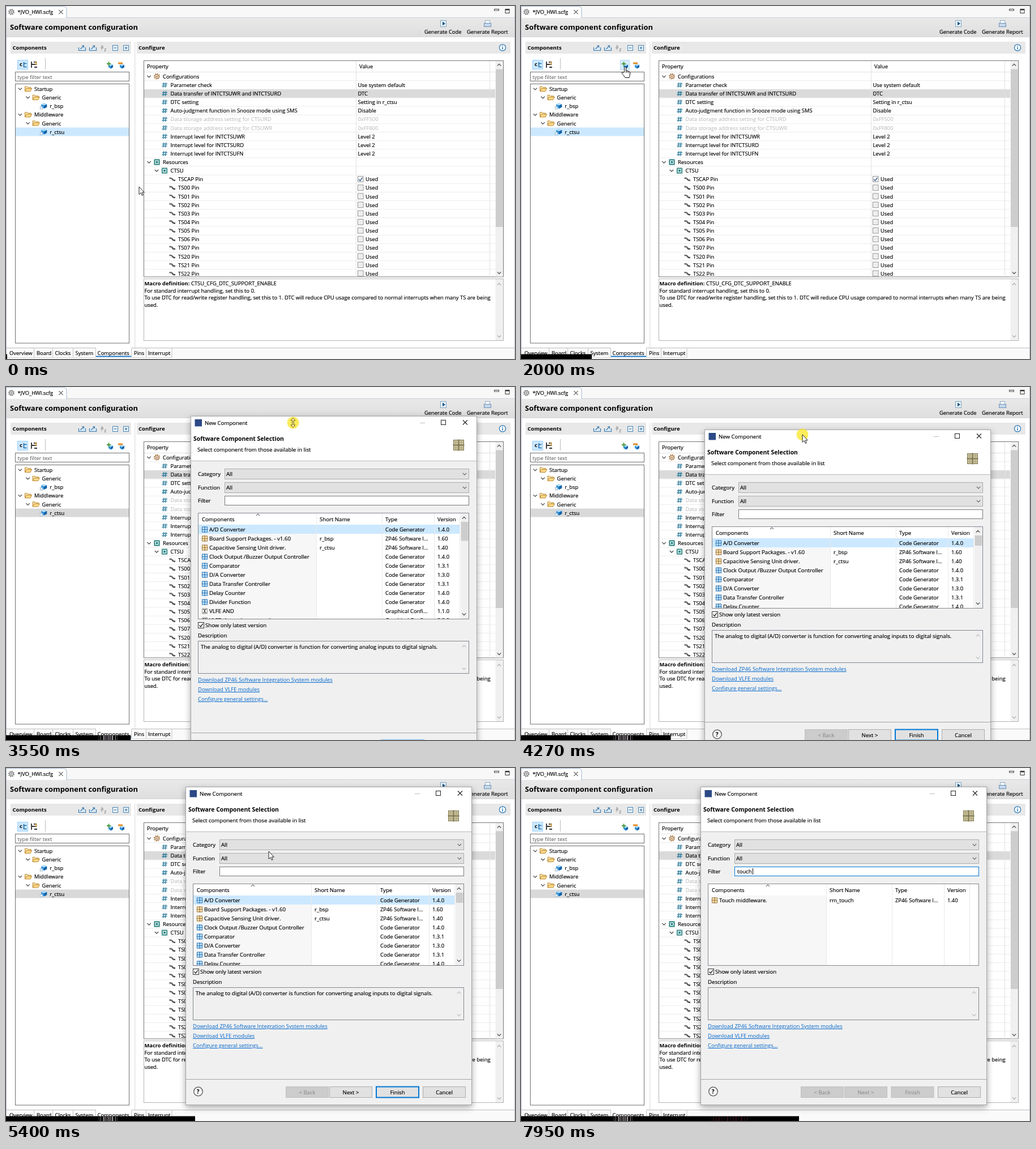
Animation, 899 px wide and 623 px high, one loop 7.99 s. Source, as an HTML page:

```html
<!DOCTYPE html>
<html lang="en">
<head>
<meta charset="utf-8">
<title>Component configuration</title>
<style>
html, body { margin: 0; width: 100%; height: 100%; overflow: hidden; background: #fff; }
svg { display: block; width: 899px; height: 623px; }
text { font: 9.4px "Open Sans", "Noto Sans", sans-serif; white-space: pre; }
text[fill="#000"] { stroke: #000; stroke-width: .18px; }
#dialog text { font-size: 9.62px; }
#dialog text.col { font-size: 9.4px; }
#dialog text.link { font-size: 9.5px; }
#dialog #about { font-size: 9.68px; }
</style>
</head>
<body>
<svg id="stage" viewBox="0 0 899 623" xmlns="http://www.w3.org/2000/svg"></svg>
<script>
const LOOP = 7990;
const stage = document.getElementById('stage');
const $ = id => document.getElementById(id);

// Drawing helpers
const esc = s => s.replace(/&/g, '&amp;').replace(/</g, '&lt;').replace(/>/g, '&gt;');
const text = (x, y, s, fill = '#000', extra = '') =>
  `<text x="${x}" y="${y}" fill="${fill}" ${extra}>${esc(s)}</text>`;
const bold = (x, y, s, size) => text(x, y, s, '#000', `style="font-weight:700;font-size:${size}px;stroke:none"`);
const rect = (x, y, w, h, fill, stroke = 'none', extra = '') =>
  `<rect x="${x}" y="${y}" width="${w}" height="${h}" fill="${fill}" stroke="${stroke}" ${extra}/>`;
const path = (d, stroke, width = 1, fill = 'none', extra = '') =>
  `<path d="${d}" fill="${fill}" stroke="${stroke}" stroke-width="${width}" ${extra}/>`;
const chevron = (x, y, dir = 1, color = '#444', r = 3.2) =>
  path(`M${x - r} ${y - dir * r / 2}L${x} ${y + dir * r / 2}L${x + r} ${y - dir * r / 2}`, color, 1.2);
const cross = (x, y, r, color) =>
  path(`M${x - r} ${y - r}L${x + r} ${y + r}M${x + r} ${y - r}L${x - r} ${y + r}`, color, 1.1);
const tick = (x, y, color) => path(`M${x + 2} ${y + 5}l2.4 2.6l4 -5.4`, color, 1.4);

// Icons, drawn around their centre
const gear = (x, y, c) => `<circle cx="${x}" cy="${y}" r="4.4" fill="none" stroke="${c}" stroke-width="2" stroke-dasharray="2 1.4"/>
  <circle cx="${x}" cy="${y}" r="3.2" fill="#eee" stroke="${c}"/><circle cx="${x}" cy="${y}" r="1.2" fill="${c}"/>`;
const folder = (x, y) => path(`M${x - 6} ${y + 4}V${y - 4}h4l1.5 1.5h5V${y}`, '#b9862f', 1, '#fbe7b0') +
  path(`M${x - 6} ${y + 4.3}l2.6 -5h9.6l-2.6 5Z`, '#b9862f', 1, '#ffd98a');
const cube = (x, y, r = 5) => path(`M${x - r} ${y - r / 2}l${r} -2l${r} 2v${r}l${-r} 2.6l${-r} -2.6Z`, 'none', 0, '#2f92db') +
  path(`M${x - r} ${y - r / 2}l${r} -2l${r} 2l${-r} 2Z`, 'none', 0, '#b4e0f8') +
  path(`M${x} ${y - r / 2 + 2}l${r} -2v${r}l${-r} 2.6Z`, 'none', 0, '#1663a8');
const part = (x, y) => cube(x + 1, y - .5) + rect(x - 6, y + 1, 4.5, 4.5, '#e4eef5', '#8fb0c6', 'stroke-width=".7"');
const chip = (x, y) => rect(x - 5, y - 5, 10, 10, 'none', '#5f9a98', 'stroke-dasharray="1.5 1"') +
  rect(x - 4, y - 4, 8, 8, '#d9f0ec', '#227b7d', 'stroke-width="1.4" rx="1"') + rect(x - 1.7, y - 1.7, 3.4, 3.4, '#227b7d');
const hash = (x, y) => path(`M${x - 1} ${y - 4.5}l-1.5 9M${x + 2.6} ${y - 4.5}l-1.5 9M${x - 4} ${y - 1.7}h9M${x - 4.6} ${y + 1.8}h9`, '#2d7c9b', 1.3);
const pin = (x, y) => path(`M${x - 5} ${y - 2}h2.5q2 0 3 2t3 2h2`, '#555', 2.6) +
  path(`M${x - 5} ${y - 2.6}h2.5q2 0 3 2`, '#aaa', .8);
const grid = (x, y, r, fill, line) => rect(x - r, y - r, 2 * r, 2 * r, fill, line) +
  path(`M${x} ${y - r - 1}v${2 * r + 2}M${x - r - 1} ${y}h${2 * r + 2}`, line, r > 6 ? 2 : 1.2);
const flow = (x, y) => rect(x - 4.5, y - 4.5, 9, 9, '#eee', '#777', 'stroke-dasharray="2 1"') +
  path(`M${x - 3} ${y - 3}h2l2 6h2M${x - 3} ${y + 3}h2l2 -6h2`, '#443d33', 1);
const tray = (x, y) => path(`M${x - 6} ${y - 1}v5.5h12v-5.5`, '#3c79aa', 1.2, '#dbeaf5') +
  path(`M${x - 3} ${y + 2}l6 -6m-3.5 0h3.5v3.5`, '#3c79aa', 1.2);

function header() {
  return rect(0, 0, 899, 623, '#fff') + rect(0, 0, 899, 20, '#f8f8f8') +
    path('M0 20.5H899', '#c9ced6') +
    path('M.5 21V.5H101q6 0 6 6V21', '#9fb4d0', 1, '#fff') +
    gear(9.5, 10.5, '#777') + text(20.5, 14, '*JVO_HWI.scfg') + cross(97, 10.5, 3.6, '#555') +
    rect(862.5, 5.5, 8, 2.5, '#fff', '#444') + rect(882, 5.5, 7, 7, '#fff', '#333') + path('M882 6.5h7', '#333', 2) +
    rect(1, 21, 897, 33.5, 'url(#band)') + path('M0 54.5H899', '#d5d5d5') +
    bold(7, 41.5, 'Software component configuration', 12.95) +
    rect(767.5, 25.5, 10, 11, '#eaf4fb', '#7ca5c1') + path('M771 27.5l5 3.5l-5 3.5Z', 'none', 0, '#20557e') +
    text(739, 48.5, 'Generate Code') +
    rect(846.5, 25.5, 8, 5, '#fff', '#8fa9c5') + rect(844.5, 30.5, 12, 6, '#c5d8ec', '#6e91b5') +
    text(814, 48.5, 'Generate Report');
}

function leftPanel() {
  const rows = [['Startup', 0], ['Generic', 1], ['r_bsp', 2], ['Middleware', 0], ['Generic', 1], ['r_ctsu', 2]];
  let s = rect(8, 63, 213, 21, '#e8e8e8') + bold(11.5, 76.5, 'Components', 9.5) +
    tray(134.5, 74) + tray(153.5, 74) + text(167, 75, 'a', '#777') + text(173, 79.5, 'z', '#777') + path('M169 69v9', '#aaa') +
    rect(188.5, 69.5, 9, 9, '#eef6fc', '#4b86b4') + path('M190.5 74h5', '#23639a') +
    rect(207.5, 69.5, 9, 9, '#eef6fc', '#4b86b4') + path('M209.5 74h5M212 71.5v5', '#23639a') +
    rect(20.5, 95.5, 18, 16, '#cce8ff', '#99d1ff') + bold(24, 106, 'c', 9.5) +
    path('M31.5 99v9M31.5 101.5h5M31.5 107.5h5', '#1f6da8', 1.6) +
    path('M45 98v11M45 103h9M49 99h5M50 108h5', '#333', 1.8) + path('M51 98l3 3l-3 3', '#d99a2b', 1.4) +
    path('M69.5 92v20', '#bbb') +
    rect(175.5, 95.5, 16, 17, '#d8ecfb', '#b5daf4', 'id="hover"') +
    cube(185, 106, 4) + path('M178 102h7M181.5 98.5v7', '#4c9a3f', 2) +
    cube(205, 106, 4) + rect(198, 99.5, 8, 3, '#e58b27') +
    rect(16.5, 116.5, 201, 16, '#fff', '#6f6f6f', 'id="search"') + text(20.5, 129, 'type filter text', '#555') +
    rect(16.5, 137.5, 201, 457.5, '#fff', '#6f6f6f') + rect(17, 214.5, 200, 15, '#cce8ff', 'none', 'id="picked"');
  rows.forEach(([label, depth], i) => {
    const y = 146.2 + i * 15.15, x = 50 + depth * 13.6;
    s += depth < 2 ? chevron(x - 25, y) + folder(x - 10.5, y) : part(x - 11, y);
    s += text(x, y + 3.7, label);
  });
  return s + rect(226, 63, 3.5, 540, '#f1f1f1');
}

function properties() {
  const top = [['Configurations', '', 'gear'], ['Parameter check', 'Use system default'],
    ['Data transfer of INTCTSUWR and INTCTSURD', 'DTC'], ['DTC setting', 'Setting in r_ctsu'],
    ['Auto-judgment function in Snooze mode using SMS', 'Disable'],
    ['Data storage address setting for CTSURD', '0xFF500', 'off'],
    ['Data storage address setting for CTSUWR', '0xFF800', 'off'],
    ['Interrupt level for INTCTSUWR', 'Level 2'], ['Interrupt level for INTCTSURD', 'Level 2'],
    ['Interrupt level for INTCTSUFN', 'Level 2'], ['Resources', '', 'chip'], ['CTSU', '', 'sub']];
  const pins = ['CAP', '00', '01', '02', '03', '04', '05', '06', '07', '20', '21', '22'];
  const rows = top.concat(pins.map(p => [`TS${p} Pin`, 'Used', 'pin']));
  let body = '';
  rows.forEach(([name, value, kind], i) => {
    const y = 124.2 + i * 15.13, b = y + 3.6, ink = kind === 'off' ? '#b5b5b5' : '#000';
    body += path(`M244 ${y + 7.6}H864`, '#ececec');
    if (kind === 'pin') {
      body += pin(293.5, y) + text(304, b, name) + rect(621.5, y - 5, 9.5, 9.5, '#fff', '#8a8a8a') + text(635, b, value);
      body += i === 12 ? tick(621, y - 5, '#30568f') : rect(623, y - 3.5, 6.5, 6.5, '#ececec');
    } else if (kind === 'gear' || kind === 'chip') {
      body += chevron(252.5, y) + (kind === 'gear' ? gear(266.5, y, '#a9743c') : chip(266.5, y)) + text(277, b, name);
    } else if (kind === 'sub') {
      body += chevron(266, y) + chip(280, y) + text(290.5, b, name);
    } else body += hash(280, y) + text(290.5, b, name, ink) + text(621.5, b, value, ink);
  });
  return rect(231, 63, 660, 21, '#e8e8e8') + bold(234, 76.5, 'Configure', 9.6) +
    `<circle cx="877" cy="73.5" r="5.6" fill="#fff" stroke="#2474b5" stroke-width="1.2"/>` +
    path('M877 72.5v4M877 70v1.3', '#2474b5', 1.6) +
    rect(243.5, 96.5, 635, 381.5, '#fff', '#777') + text(249, 110, 'Property') + text(624, 110, 'Value') +
    rect(244, 147, 620, 15, '#dadada') + `<g clip-path="url(#table)">${body}</g>` +
    path('M244 116.6H864M618.5 97V478M854.5 97V478', '#e2e2e2') +
    rect(864.5, 97, 13.5, 380.5, '#f0f0f0') + rect(865, 111.5, 12.5, 278.5, '#cdcdcd') +
    chevron(871, 104, -1) + chevron(871, 471) +
    rect(243.5, 481.5, 635, 109, '#fff', '#b4b4b4') + rect(864.5, 482, 13.5, 108, '#f0f0f0') +
    chevron(871, 491, -1, '#aaa') + chevron(871, 583, 1, '#aaa') +
    bold(244.5, 493, 'Macro definition:', 9.35) + text(327, 493, 'CTSU_CFG_DTC_SUPPORT_ENABLE') +
    ['For standard interrupt handling, set this to 0.',
      'To use DTC for read/write register handling, set this to 1. DTC will reduce CPU usage compared to normal interrupts when many TS are being',
      'used.'].map((line, i) => text(244.5, 505.5 + i * 12.6, line)).join('');
}

function tabs() {
  const items = [['Overview', 6], ['Board', 54], ['Clocks', 86.5], ['System', 122.5], ['Components', 161.5], ['Pins', 226], ['Interrupt', 251]];
  return rect(0, 604, 899, 19, '#fafafa') + path('M0 603.5H899', '#bcbcbc') +
    rect(159, 603, 62.5, 16, '#fff') + path('M159 618.5h62.5', '#1d78c9', 2) +
    path('M49.5 604v16M82.5 604v16M118.5 604v16M158.5 604v16M221.5 604v16M247.5 604v16M293 604v16', '#c4c4c4') +
    path('M0 620.5H159M222 620.5H293', '#d8d8d8') +
    items.map(([s, x]) => text(x, 615.5, s)).join('') + path('M.5 0V623M898.5 0V623', '#b9c0cb');
}

// Dialog: the upper part hangs from the top edge, the lower part follows the list bottom
const W = 505;
const button = (x, label, id) => rect(x, 214.5, 75, 19, '#e1e1e1', '#adadad', `id="${id}"`) +
  text(x + 37.5, 227.5, label, '#000', `text-anchor="middle" id="${id}Text"`);
const combo = (label, y) => text(13, y + 13.3, label) + rect(60.5, y + .5, 431, 18, '#e1e1e1', '#adadad') +
  text(63, y + 13.3, 'All') + chevron(484, y + 9.5, 1, '#666');

function dialog() {
  const top = rect(1, 1, W - 1, 79, '#fff') + path(`M1 79.5H${W}`, '#b8b8b8') +
    rect(7.5, 6, 12.5, 12.5, '#2b4a86') + text(25, 15.7, 'New Component') +
    path('M405 12.5h9', '#bbb') + rect(442.5, 7.5, 8, 8, 'none', '#222') + cross(485, 11.5, 4, '#222') +
    bold(5, 43.5, 'Software Component Selection', 10.4) +
    text(12, 63, 'Select component from those available in list') + grid(473.5, 51.5, 9, '#c8c09a', '#7c744f') +
    path('M464 46.5h19M464 56.5h19M468.5 42v19M478.5 42v19', '#a39b72', .7) +
    combo('Category', 93) + combo('Function', 117) +
    text(13, 153, 'Filter') + rect(60.5, 141.5, 431, 16, '#fff', '#7a7a7a', 'id="filter"') +
    text(65, 153, '', '#000', 'id="query"') + path('M0 144v11', '#000', 1, 'none', 'id="caret"') +
    rect(13.5, 171.5, 478, 144, '#fff', '#828790', 'id="list"') +
    `<g clip-path="url(#rowClip)">` + rect(14, 192, 209, 500, '#f7f7f7') + `<g id="rows"></g>` +
    path('M222.5 172V700M338.5 172V700M430.5 172V700M475.5 172V700', '#e9e9e9') + `</g>` +
    text(20, 185.5, 'Components') + text(228, 185.5, 'Short Name') +
    text(344, 185.5, 'Type') + text(436, 185.5, 'Version', '#000', 'class="col"') + chevron(119, 174.5, -1, '#777', 3) +
    `<g id="scroll">` + rect(477, 172, 14, 143, '#f0f0f0', 'none', 'id="track"') +
    rect(477.5, 187, 13, 16, '#cdcdcd', 'none', 'id="thumb"') + chevron(483, 180, -1) +
    `<g id="down">${chevron(483, 0)}</g></g>`;
  const low = rect(13.5, 6.5, 10, 10, '#fff', '#333') + tick(13.5, 6.5, '#222') + text(26, 15.2, 'Show only latest version') +
    text(13, 33, 'Description') + rect(13.5, 39.5, 478, 57, '#f0f0f0', '#828790') +
    text(18, 52.5, 'The analog to digital (A/D) converter is function for converting analog inputs to digital signals.', '#000', 'id="about"') +
    chevron(483, 48.5, -1, '#bbb') + chevron(483, 88, 1, '#bbb') +
    ['Download ZP46 Software Integration System modules', 'Download VLFE modules', 'Configure general settings...']
      .map((s, i) => text(13, 111 + i * 17, s, '#0066cc', 'class="link" text-decoration="underline"')).join('') +
    path(`M1 201.5H${W}`, '#a5a5a5') +
    `<circle cx="22.5" cy="223" r="7.8" fill="#f6f6f6" stroke="#555" stroke-width="1.3"/>` + bold(19.8, 227, '?', 10) +
    button(177.5, '< Back', 'back') + button(254.5, 'Next >', 'next') +
    button(337, 'Finish', 'finish') + button(419.5, 'Cancel', 'cancel');
  return `<g id="dialog">` + rect(.5, .5, W, 561, '#f0f0f0', '#a6a6a6', 'id="frame" filter="url(#shadow)"') +
    `<g id="content">${top}<g id="low">${low}</g></g></g>`;
}

const CODE = 'Code Generator', SOFT = 'ZP46 Software I...', GRAPH = 'Graphical Confi...';
const parts = [['A/D Converter', '', CODE, '1.4.0'], ['Board Support Packages. - v1.60', 'r_bsp', SOFT, '1.60'],
  ['Capacitive Sensing Unit driver.', 'r_ctsu', SOFT, '1.40'], ['Clock Output /Buzzer Output Controller', '', CODE, '1.4.0'],
  ['Comparator', '', CODE, '1.3.1'], ['D/A Converter', '', CODE, '1.3.0'], ['Data Transfer Controller', '', CODE, '1.3.1'],
  ['Delay Counter', '', CODE, '1.4.0'], ['Divider Function', '', CODE, '1.4.0'],
  ...['AND', 'chattering prevention', 'D flip flop', 'edge detection thinning function', 'EXOR', 'manchester decoder']
    .map((s, i) => ['VLFE ' + s, '', GRAPH, i % 2 ? '2.0.0' : '1.1.0']),
  ['Touch middleware.', 'rm_touch', SOFT, '1.40']];

function listRows(query, focused) {
  let s = query.length < 2 ? rect(14, 192, 462, 16, focused ? '#d9d9d9' : '#cce8ff') : '';
  parts.filter(p => p[0].toLowerCase().includes(query)).forEach(([name, short, type, version], i) => {
    const y = 200.5 + 16 * i, b = y + 3.6;
    s += type === CODE ? grid(25, y, 4.5, '#bfe0f7', '#2f78b7') : type === SOFT ? grid(25, y, 4.5, '#f4e2b4', '#a2763a') : flow(25, y);
    s += text(33, b, name) + text(228, b, short) + text(344, b, type, '#000', 'class="col"') + text(436, b, version, '#000', 'class="col"');
  });
  return s;
}

const cursors = {
  arrow: path('M0 0V13.5L3.2 10.7L5.3 15.5L7.4 14.6L5.3 10H9.3Z', '#222', 1, '#fff'),
  hand: path('M-1.5 9V1q0 -2 1.5 -2t1.5 2V6l6 1.5q1.5 .5 1.3 2.5l-1 5.5l-.8 3h-7l-3.5 -5l-2.5 -3q0 -2 2 -1.5Z', '#111', 1, '#fff') +
    path('M1.5 6v4M4 7v3M6.5 7.5v3', '#111', .9),
  beam: path('M-2.5 -7q2.5 0 2.5 1.5q0 -1.5 2.5 -1.5M0 -5.5V6M-2.5 7.5q2.5 0 2.5 -1.5q0 1.5 2.5 1.5', '#222', 1),
  size: path('M0 -8.5L4 -4H1.2V4H4L0 8.5L-4 4H-1.2V-4H-4Z', '#6b5f1a', 1, '#fdf3a0')
};

// Faint marks inside the progress bar: a pale group, then a dark red one
function stripes() {
  let s = '';
  for (let i = 0; i < 26; i++) {
    const late = i > 11, n = Math.abs(Math.sin(i * 12.9) * 43.7) % 1;
    const x = late ? 334 + (i - 12) * 5 : 163 + i * 3, v = Math.round(late ? 40 + n * 30 : 90 + n * 150);
    s += rect(x, 615, .6 + n, 8, late ? `rgb(${v},20,28)` : `rgb(${v},${v - 8},${v})`);
  }
  return s;
}

stage.innerHTML = `<defs>
  <linearGradient id="band" x2="0" y2="1"><stop stop-color="#e9e9e9"/><stop offset="1" stop-color="#dedede"/></linearGradient>
  <clipPath id="table"><rect x="244" y="97" width="634" height="380.5"/></clipPath>
  <clipPath id="rowClip"><rect id="rowBox" x="14" y="172" width="477" height="143"/></clipPath>
  <clipPath id="barClip"><rect id="barBox" y="614" height="9"/></clipPath>
  <filter id="shadow" x="-10%" y="-10%" width="120%" height="120%"><feDropShadow dx="0" dy="4" stdDeviation="6" flood-opacity=".35"/></filter>
  </defs>` + header() + leftPanel() + properties() + tabs() + dialog() +
  `<g id="pointer"><circle id="press" r="10.5" fill="#f9e625" opacity=".75"/>` +
  Object.keys(cursors).map(k => `<g id="${k}">${cursors[k]}</g>`).join('') + `</g>` +
  `<g clip-path="url(#barClip)">${rect(0, 614.5, 899, 9, '#000')}${stripes()}</g>`;

// Keys: [time, x, y]
const pointerKeys = [[860, 235, 319], [1560, 188, 124], [1900, 184, 108], [2350, 184, 108], [3180, 508, -20],
  [3320, 508, -9], [3550, 507, 63], [3760, 506, 106], [3980, 499, 104], [4070, 499, 104], [4270, 497, 84],
  [4620, 490, 43], [4950, 490, 43], [5400, 464, 147], [5800, 446, 182]];
const dialogKeys = [[3320, 326, -26], [3550, 326, 51], [3760, 326, 94], [4070, 326, 94], [4270, 324, 75], [4620, 317, 33]];
const typedAt = [6650, 6980, 7340, 7580, 7800];

// Whole-pixel position on a line of keys
function track(keys, t) {
  const i = keys.findIndex(k => k[0] > t);
  if (i === 0) return keys[0].slice(1);
  if (i < 0) return keys[keys.length - 1].slice(1);
  const [a, b] = [keys[i - 1], keys[i]], u = (t - a[0]) / (b[0] - a[0]);
  return [1, 2].map(n => Math.round(a[n] + (b[n] - a[n]) * u));
}
const within = (t, a, b) => t >= a && t < b;
const set = (id, attrs) => { for (const k in attrs) $(id).setAttribute(k, attrs[k]); };
const show = (id, on) => set(id, { display: on ? 'inline' : 'none' });
const move = (id, x, y) => set(id, { transform: `translate(${x} ${y})` });

function setButton(id, on, main) {
  const strong = on && main;
  set(id, { fill: on ? '#e1e1e1' : '#cccccc', stroke: strong ? '#0078d7' : on ? '#adadad' : '#bfbfbf', 'stroke-width': strong ? 2 : 1 });
  set(id + 'Text', { fill: on ? '#000' : '#838383' });
}

let listState = '';
function render(t) {
  const open = t >= 2380, focused = t >= 5950;
  const query = 'touch'.slice(0, typedAt.filter(k => t >= k).length);
  const chosen = query.length < 2;

  const [px, py] = track(pointerKeys, t);
  const inSearch = !open && py < 133 && py > 116;
  const onAdd = !open && py <= 116;
  const kind = inSearch || t > 5760 ? 'beam' : onAdd ? 'hand' : within(t, 3180, 3790) ? 'size' : 'arrow';
  move('pointer', px, py);
  Object.keys(cursors).forEach(k => show(k, k === kind));
  show('pointer', t < typedAt[0]);
  show('press', within(t, 2080, 2230) || within(t, 3260, 3760) || within(t, 4050, 4680) || within(t, 5900, 6050));
  show('hover', onAdd);
  set('search', { stroke: inSearch ? '#0078d7' : '#6f6f6f' });
  set('picked', { fill: open ? '#d9d9d9' : '#cce8ff' });

  // Dragging the top edge shrinks the list to its least height; later the window moves whole
  show('dialog', open);
  const [dx, dy] = track(dialogKeys, t);
  const bottom = t < 4070 ? Math.max(315, 409 - dy) : 315;
  const height = bottom - 171;
  move('dialog', dx, dy);
  move('low', 0, bottom);
  show('content', t >= 2500);
  set('frame', { height: bottom + 246 });
  set('list', { height });
  set('rowBox', { height: height - 1 });
  set('track', { height: height - 1 });
  set('thumb', { height: (height - 32) * (height - 21) / 768 });
  move('down', 0, bottom - 8);
  show('scroll', chosen);

  const state = query + focused;
  if (state !== listState) {
    listState = state;
    $('rows').innerHTML = listRows(query, focused);
    $('query').textContent = query;
  }
  set('filter', { stroke: focused ? '#0078d7' : '#7a7a7a' });
  show('caret', focused && (query || within((t - 5950) % 1060, 0, 530)));
  move('caret', 66 + (query ? Math.round($('query').getComputedTextLength()) : 0) + .5, 0);
  show('about', chosen);
  setButton('back', false);
  setButton('next', chosen);
  setButton('finish', chosen, true);
  setButton('cancel', true);

  set('barBox', { width: 2 + t * .0615 });
}

let start;
function frame(now) {
  start ??= now;
  render((now - start) % LOOP);
  requestAnimationFrame(frame);
}
render(0);
requestAnimationFrame(frame);
</script>
</body>
</html>
```
